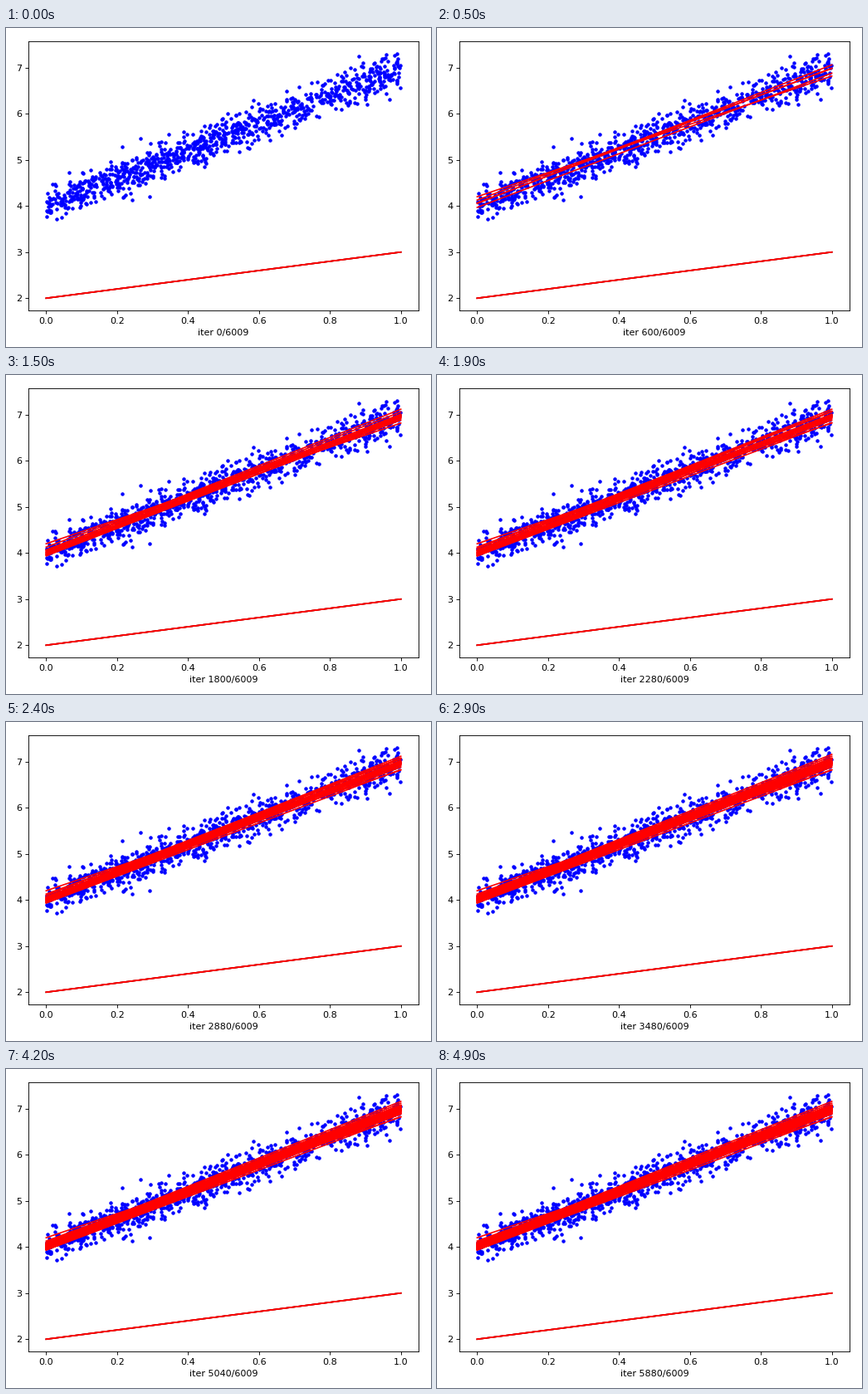
These frames come from a looping animation (512x384 px, 5 s). A matplotlib script:

```python
import numpy as np
import matplotlib.pyplot as plt
from matplotlib.animation import FuncAnimation

WIDTH, HEIGHT, DPI = 512, 384, 80
FRAMES, INTERVAL = 50, 100
STEP, TOTAL = 120, 6009
RATE = 0.1

np.random.seed(2)
x = np.random.rand(1000)
y = 4 + 3 * x + 0.2 * np.random.randn(1000)
np.random.rand(2)  # skip two draws before shuffling


def stochastic_descent(steps):
    """Return (intercept, slope) before and after each single-sample update."""
    w = np.array([2.0, 1.0])
    path = [w]
    while len(path) <= steps:
        for i in np.random.permutation(len(x)):
            features = np.array([1.0, x[i]])
            w = w - RATE * features * (features @ w - y[i])
            path.append(w)
    return path


path = stochastic_descent(STEP * (FRAMES - 1))

plt.rcParams["font.family"] = "DejaVu Sans"
fig = plt.figure(figsize=(WIDTH / DPI, HEIGHT / DPI), dpi=DPI, facecolor="white")
left, right, top, bottom = 27, 497, 16, 340
ax = fig.add_axes([left / WIDTH, 1 - bottom / HEIGHT,
                   (right - left) / WIDTH, (bottom - top) / HEIGHT])


def draw_fit(w, color):
    intercept, slope = w
    return ax.plot([0, 1], [intercept, intercept + slope], color=color)[0]


ax.plot(x, y, "b.")
draw_fit(path[0], "black")
draw_fit(path[0], "red")
fits = [draw_fit(w, "red") for w in path[:STEP * FRAMES:STEP]]
label = ax.set_xlabel("")


def update(k):
    for i, line in enumerate(fits):
        line.set_visible(i <= k)
    label.set_text(f"iter {k * STEP}/{TOTAL}")
    return [*fits, label]


anim = FuncAnimation(fig, update, frames=FRAMES, interval=INTERVAL,
                     repeat=True, repeat_delay=0, blit=False)
plt.show()
```
